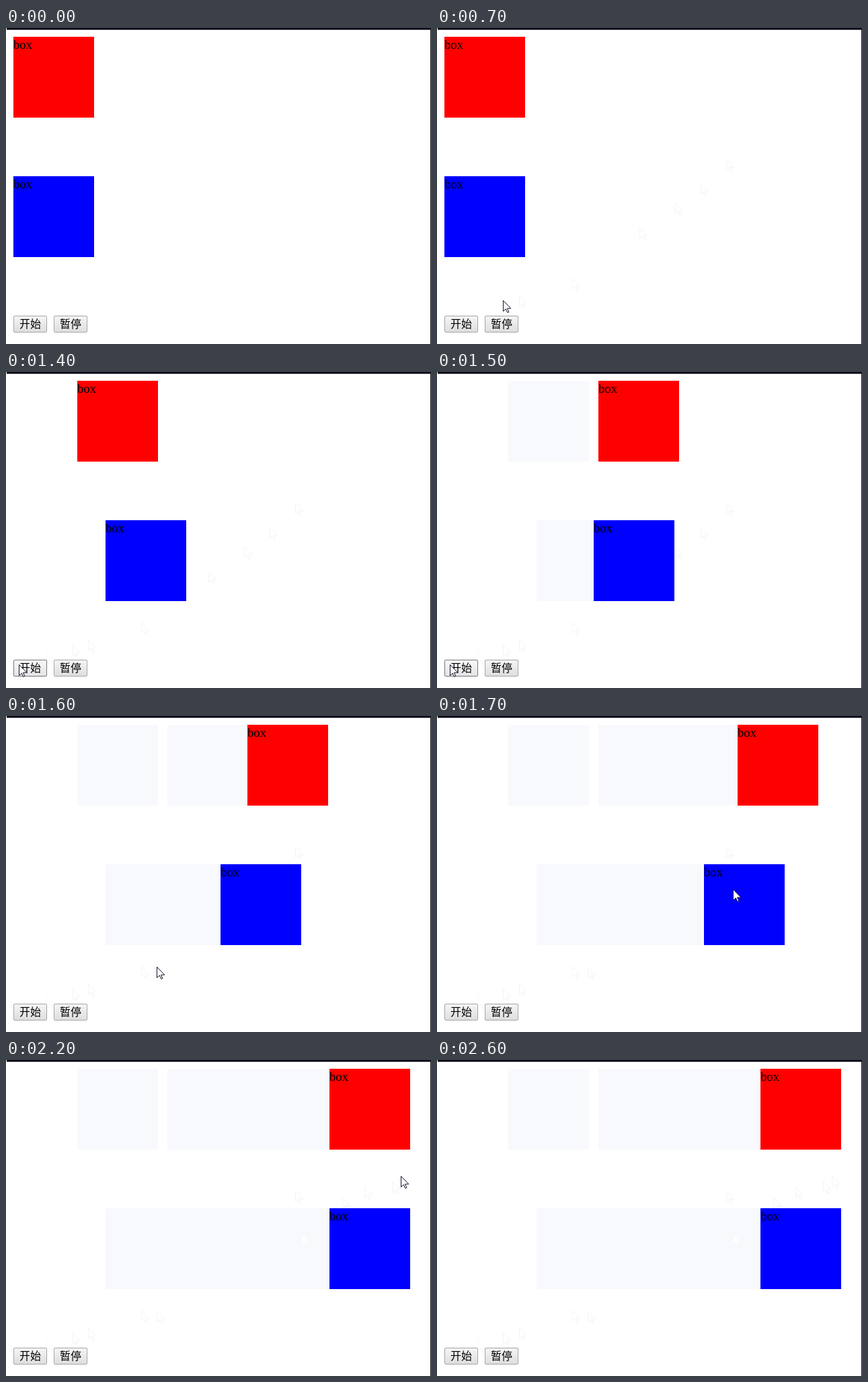
Animation of 632x469 px, one loop 2900 ms. Source, as an HTML page:

```html
<!DOCTYPE html>
<html lang="zh">
<head>
<meta charset="utf-8">
<style>
html, body { margin: 0; width: 100%; height: 100%; overflow: hidden; background: #fff; }
svg { display: block; width: 632px; height: 469px; }
.word { font: 18.67px "Liberation Serif", serif; }
.label { font: 300 16px "Noto Sans CJK SC", "Noto Sans CJK", sans-serif; }
.trail path { fill: none; stroke: #f4f4f5; }
.veil { fill: #f8f9fc; }
</style>
</head>
<body>
<svg viewBox="0 0 632 469" xmlns="http://www.w3.org/2000/svg">
  <defs>
    <linearGradient id="up" x2="0" y2="1"><stop stop-color="#f5f5f5"/><stop offset="1" stop-color="#dedede"/></linearGradient>
    <linearGradient id="hot" x2="0" y2="1"><stop stop-color="#f8f8f8"/><stop offset="1" stop-color="#e4e4e4"/></linearGradient>
    <linearGradient id="down" x2="0" y2="1"><stop stop-color="#d2d2d2"/><stop offset="1" stop-color="#f6f6f6"/></linearGradient>
  </defs>
  <rect width="632" height="469" fill="#fff"/>
  <path d="M1 0H632V2H1Z" fill="#0c0a12"/>
  <path d="M1 2H632V3H1Z" fill="#56545c"/>
  <path d="M631 0H632V469H631Z" fill="#16141c"/>
  <g id="trail" class="trail"></g>
  <g id="veils" class="veil"></g>
  <path id="hole" fill="#fff"/>
  <g id="red"><rect y="13" width="120" height="120" fill="#f00"/><text class="word" y="31">box</text></g>
  <g id="blue"><rect y="220" width="120" height="120" fill="#00f"/><text class="word" y="238">box</text></g>
  <rect id="start" x="11.5" y="427.5" width="49" height="24" rx="1.5"/>
  <text class="label" x="20" y="445">开始</text>
  <rect x="71.5" y="427.5" width="49" height="24" rx="1.5" fill="url(#up)" stroke="#a6a6a6"/>
  <text class="label" x="80" y="445">暂停</text>
  <path id="cursor" fill="#fff" stroke="#15132a"/>
</svg>
<script>
const STEP = 100, LOOP = 2900, HOME = 11, END = 481;
const ARROW = 'M.5 .5V16.5L4.3 13L6.8 18.4L8.9 17.5L6.5 12.2H11.8Z';
const $ = id => document.getElementById(id);

// pointer tip at each step
const tips = [
  null, [430, 194], [392, 230], [354, 259], [301, 296], [201, 371], [122, 397],
  [98, 404], [60, 415], [27, 432], ...Array(6).fill([19, 434]),
  [224, 372], [440, 257], [477, 225],
  [500, 204], [533, 188], [574, 180], [587, 172], [608, 170], [614, 166], [621, 162]
];

// box travel: first move at step 14
const FIRST = 14;
const runs = {
  red: { y: 13, xs: [106, 240, 359, 447, END] },
  blue: { y: 220, xs: [148, 233, 319, 397, END] }
};

function add(parent, tag, attrs) {
  const el = document.createElementNS('http://www.w3.org/2000/svg', tag);
  for (const key in attrs) el.setAttribute(key, attrs[key]);
  return parent.appendChild(el);
}
const show = (el, on) => el.setAttribute('visibility', on ? 'visible' : 'hidden');
const place = (el, x, y) => el.setAttribute('transform', `translate(${x} ${y})`);

// marks left behind, each shown after its step has passed
const marks = [];
const leave = (el, step) => marks.push({ el, step });

tips.forEach((tip, i) => {
  const onButton = i > 8 && i < 16;
  if (!tip || onButton || i === 17 || i === 18 || i > 22) return;
  const el = add($('trail'), 'path', { d: ARROW, opacity: i === 8 ? .5 : 1 });
  place(el, ...tip);
  leave(el, i);
});
for (const { y, xs } of Object.values(runs)) {
  xs.slice(0, -1).forEach((x, i) =>
    leave(add($('veils'), 'rect', { x, y, width: 120, height: 120 }), FIRST + i));
}
$('hole').setAttribute('d', 'M1 2V15L4 12L6.5 17L8 16.5L6 12H10Z');
place($('hole'), ...tips[17]);
leave($('hole'), 17);
$('cursor').setAttribute('d', ARROW);

function draw(time) {
  const k = Math.floor((time % LOOP) / STEP);
  for (const { el, step } of marks) show(el, k > step);

  for (const id in runs) {
    const { xs } = runs[id];
    const x = k < FIRST ? HOME : xs[Math.min(k - FIRST, xs.length - 1)];
    place($(id), x, 0);
  }

  const over = k > 8 && k < 16, pressed = k === 12;
  $('start').setAttribute('fill', `url(#${pressed ? 'down' : over ? 'hot' : 'up'})`);
  $('start').setAttribute('stroke', pressed ? '#9a9a9a' : over ? '#777' : '#a6a6a6');

  const tip = tips[k];
  show($('cursor'), !!tip);
  if (tip) place($('cursor'), ...tip);
}

const begin = performance.now();
function tick() {
  draw(performance.now() - begin);
  requestAnimationFrame(tick);
}
draw(0);
requestAnimationFrame(tick);
</script>
</body>
</html>
```
